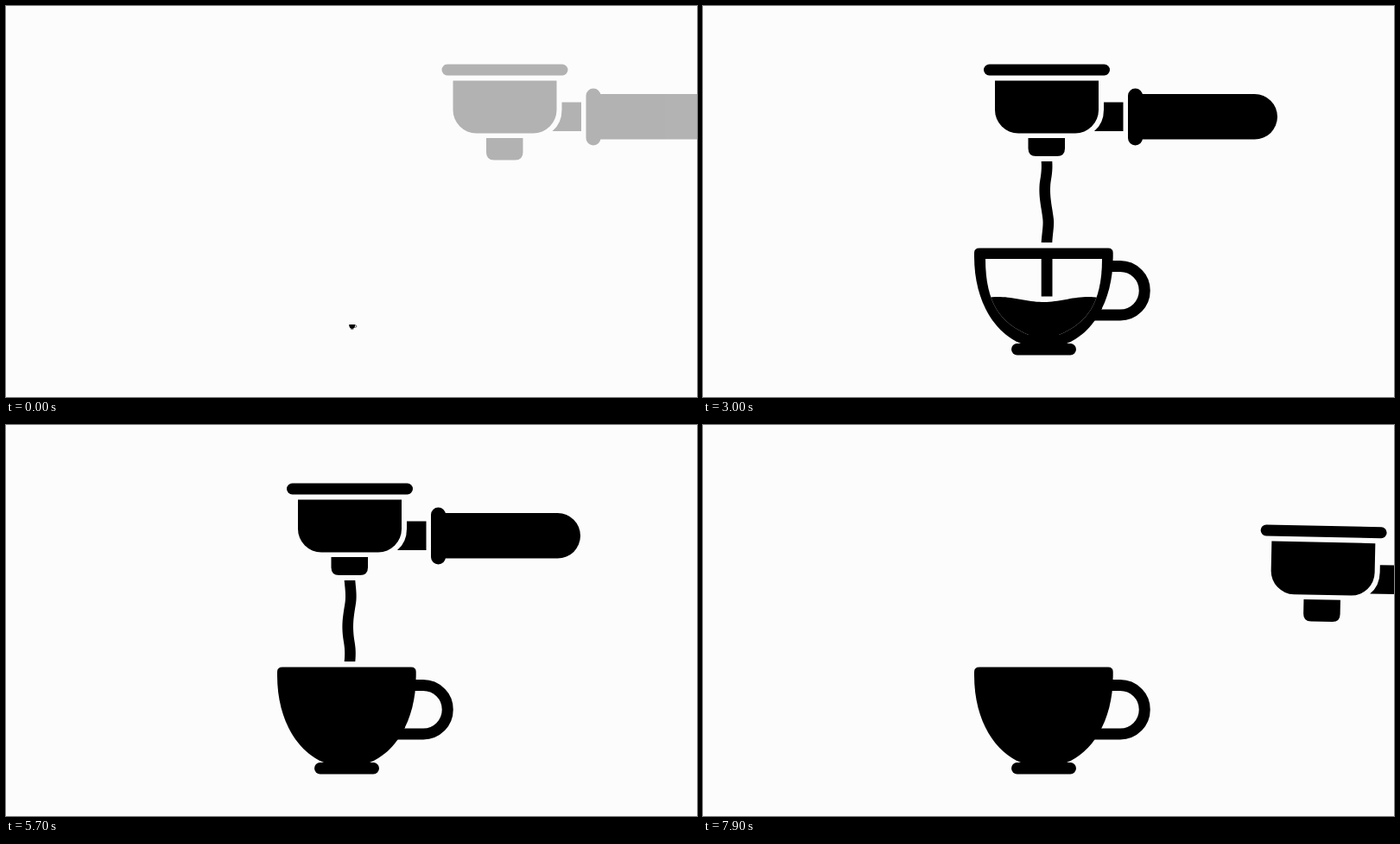
Write an HTML page that moves like this. It is 800 by 453 pixels and loops after 8000 ms.

```html
<!DOCTYPE html>
<html lang="en">
<head>
<meta charset="utf-8">
<title>Coffee pour</title>
<style>
  html, body { margin: 0; width: 100%; height: 100%; overflow: hidden; background: #fdfcfd; }
  svg { display: block; width: 100vw; height: 100vh; }
</style>
</head>
<body>
<svg viewBox="0 0 800 453" preserveAspectRatio="none">
  <defs>
    <clipPath id="bowl">
      <path d="M327 293H462C462 345 444 368 412 381H377C345 368 327 345 327 293Z"/>
    </clipPath>
  </defs>
  <g id="filter">
    <rect x="325" y="67.5" width="146" height="13" rx="6.5"/>
    <path d="M338 86.5H458V120.5A27 27 0 0 1 431 147.5H365A27 27 0 0 1 338 120.5Z"/>
    <path id="spout"/>
    <path d="M464 111.5H486.5V145H453Q464 136 464 120Z"/>
    <rect x="492" y="95.5" width="17" height="66" rx="8.5"/>
    <path d="M500 102H638.7A26.3 26.3 0 0 1 638.7 154.6H500Z"/>
  </g>
  <path id="stream"/>
  <g id="cup">
    <path d="M320 280.5H469Q474.7 280.5 474.7 286V290C474.7 345 449 380 421 391H368C340 380 314 345 314 290V286Q314 280.5 320 280.5Z"/>
    <path d="M469 301.5H483A28.2 28.2 0 0 1 483 358H452" fill="none" stroke="#000" stroke-width="13"/>
    <rect x="357" y="391" width="75" height="13.5" rx="6.7"/>
    <g id="inside" clip-path="url(#bowl)">
      <rect x="320" y="290" width="150" height="100" fill="#fdfcfd"/>
      <rect id="pour" x="391.7" y="290" width="12.8" height="0"/>
      <path id="coffee"/>
    </g>
  </g>
</svg>
<script>
const LOOP = 8000, STEP = 100;
const $ = id => document.getElementById(id);
const set = (id, name, value) => $(id).setAttribute(name, value);
const clamp = v => Math.max(0, Math.min(1, v));
const part = (t, a, b) => clamp((t - a) / (b - a));
const mix = (a, b, p) => a + (b - a) * p;
const easeOut = p => 1 - (1 - p) ** 3;

// [time, surface height]: the bowl empties, then fills
const LEVELS = [[600, 284], [1200, 392], [1800, 384], [2300, 361], [3000, 340],
                [3700, 328], [4500, 315.5], [5500, 290], [5700, 284]];

function track(rows, t) {
  if (t <= rows[0][0]) return rows[0][1];
  for (let i = 1; i < rows.length; i++) {
    const [a, from] = rows[i - 1], [b, to] = rows[i];
    if (t <= b) return mix(from, to, part(t, a, b));
  }
  return rows[rows.length - 1][1];
}

function drawFilter(t) {
  const enter = easeOut(part(t, 0, 450));
  const tilt = part(t, 7100, 7400) * 1.2;
  const leave = part(t, 7400, 7900) ** 2;
  const x = mix(179.5, 0, enter) - tilt * 2.1 + 322 * leave;
  const y = 51.5 * leave;
  set("filter", "transform", `translate(${x} ${y}) rotate(${tilt} 500 128)`);
  set("filter", "opacity", mix(0.29, 1, part(t, 0, 300)));
  const bottom = 178.5 - 4.5 * (part(t, 1300, 1500) - part(t, 6500, 6700));
  set("spout", "d", `M376.5 153H419V${bottom - 9}Q419 ${bottom} 410 ${bottom}H385.5Q376.5 ${bottom} 376.5 ${bottom - 9}Z`);
}

function drawStream(t) {
  const top = mix(180, 274, part(t, 6300, 6600));
  const end = mix(180, 274, part(t, 1400, 1700));
  if (end - top < 1) return set("stream", "d", "");
  const crest = 213 + 0.141 * (t - 3000);
  const left = [], right = [];
  for (let i = 0; i <= 32; i++) {
    const y = mix(top, end, i / 32);
    const hold = clamp(Math.min(y - 180, 274 - y) / 25);
    const x = 398 - 2.3 * hold * Math.cos((y - crest) * Math.PI / 45);
    left.push(`${x - 6.3} ${y}`);
    right.unshift(`${x + 6.3} ${y}`);
  }
  set("stream", "d", `M${left.concat(right).join("L")}Z`);
}

function drawCup(t) {
  const size = mix(0.044, 1, easeOut(part(t, 0, 450)));
  set("cup", "transform", `translate(401 373) scale(${size}) translate(-401 -373)`);
  const level = track(LEVELS, t);
  $("inside").style.display = level > 285 ? "" : "none";
  const shift = 2 * Math.PI * (t - 3000) / 1500;
  const surface = [];
  for (let x = 320; x <= 470; x += 3) {
    const y = level + 3 * Math.cos((x - 394) * Math.PI / 52 - shift);
    surface.push(`${x} ${y}`);
  }
  set("coffee", "d", `M320 395L${surface.join("L")}L470 395Z`);
  const reach = mix(290, level - 3.5, part(t, 1700, 1900));
  set("pour", "height", Math.max(0, reach - 290));
}

function frame(now) {
  const t = Math.floor((now % LOOP) / STEP) * STEP;
  drawFilter(t);
  drawStream(t);
  drawCup(t);
  requestAnimationFrame(frame);
}

let start;
requestAnimationFrame(function begin(now) {
  start = now;
  requestAnimationFrame(function tick(time) {
    frameAt(time - start);
    requestAnimationFrame(tick);
  });
  frameAt(0);
});

function frameAt(ms) {
  const t = Math.floor((ms % LOOP) / STEP) * STEP;
  drawFilter(t);
  drawStream(t);
  drawCup(t);
}
</script>
</body>
</html>
```
